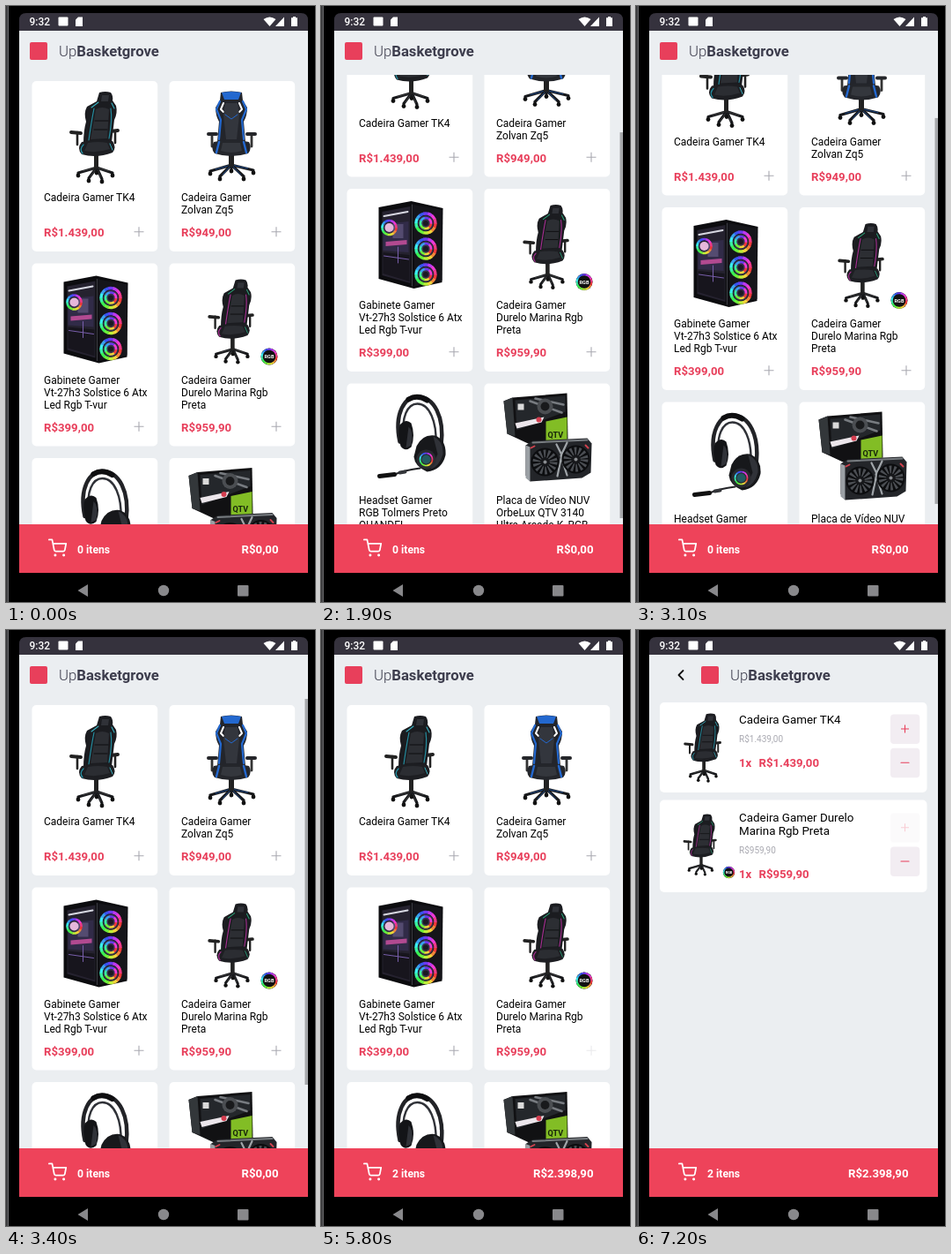
An HTML page for the animation above (8 s loop, 351x675 px).

```html
<!DOCTYPE html>
<html lang="pt-BR">
<head>
<meta charset="utf-8">
<title>Loja</title>
<style>
  html, body { margin: 0; width: 100%; height: 100%; overflow: hidden; background: #000; }
  svg { display: block; width: 351px; height: 675px; }
  text { font-family: Roboto, "Noto Sans", sans-serif; }
</style>
</head>
<body>
<svg id="stage" viewBox="0 0 351 675"></svg>
<script>
const RED = '#e83f5b', BG = '#ebeef1', DARK = '#17181b';

// ---- markup helpers ----
const text = (x, y, size, str, { fill = '#000', weight = 400, extra = '' } = {}) =>
  `<text x="${x}" y="${y}" font-size="${size}" font-weight="${weight}" fill="${fill}" ${extra}>${str}</text>`;
const rect = (x, y, w, h, fill, r = 0) =>
  `<rect x="${x}" y="${y}" width="${w}" height="${h}" rx="${r}" fill="${fill}"/>`;
const shape = (d, fill) => `<path d="${d}" fill="${fill}"/>`;
const line = (d, stroke, w = 1) =>
  `<path d="${d}" fill="none" stroke="${stroke}" stroke-width="${w}" stroke-linecap="round" stroke-linejoin="round"/>`;
const disc = (x, y, r, fill) => `<circle cx="${x}" cy="${y}" r="${r}" fill="${fill}"/>`;
const group = (x, y, body, scale = 1, extra = '') =>
  `<g transform="translate(${x} ${y}) scale(${scale})" ${extra}>${body}</g>`;
const cross = (x, y, r, color, id = '') =>
  `<path ${id && `id="${id}"`} d="M${x - r} ${y}h${2 * r}M${x} ${y - r}v${2 * r}" stroke="${color}" stroke-width="1.1"/>`;

function ring(x, y, r, w, n = 14) {
  let out = '';
  for (let i = 0; i < n; i++) {
    const a = i / n * 2 * Math.PI, b = (i + 1.1) / n * 2 * Math.PI;
    const p = k => `${(x + r * Math.cos(k)).toFixed(2)} ${(y + r * Math.sin(k)).toFixed(2)}`;
    out += `<path d="M${p(a)}A${r} ${r} 0 0 1 ${p(b)}" fill="none" stroke="hsl(${i / n * 360} 85% 58%)" stroke-width="${w}"/>`;
  }
  return out;
}

// ---- product art ----
function wheels(points, hub, trim) {
  return points.map(([x, y]) =>
    line(`M${hub[0]} ${hub[1]}L${x} ${y - 3}`, DARK, 3.2) +
    line(`M${hub[0]} ${hub[1]}L${x * .75 + hub[0] * .25} ${y - 5}`, trim, .6) +
    disc(x, y, 2.4, '#111')).join('');
}

function chair(a, b) {
  return wheels([[-19, 95], [-7, 101], [8, 102], [20, 95], [2, 92]], [2, 86], '#555') +
    rect(-1, 70, 5, 17, '#222') +
    line('M-20 46v14M23 45v13', '#222', 2.6) +
    line('M-27 46L-16 47M17 45L26 44', '#222', 4) +
    shape('M5 1Q12-1 18 1Q21 5 20 10L24 16Q26 24 22 32L19 57L-13 59Q-13 44-10 34Q-13 24-9 17L2 11Z', '#1b1c20') +
    shape('M1 20Q8 16 16 20L14 53L-5 54Z', '#2c2e33') +
    shape('M8 4h8l-1 7h-8z', '#303238') +
    line('M-1 19Q-4 34-7 55M18 19Q20 32 16 53', a, 1.2) +
    line('M4 12L-4 18M19 13l3 6', b, 1.1) +
    line('M0 33h15M-1 43h15', '#0d0d0f', 1) +
    shape('M-15 57Q2 53 20 56Q25 63 20 69Q2 76-15 71Q-21 64-15 57Z', '#1d1e22') +
    shape('M-8 58Q4 56 14 58L17 65Q2 70-12 67Z', '#2b2d32') +
    line('M-13 60Q-18 65-14 70', a, 1.3) + line('M17 59L20 66', b, 1);
}

function blueChair() {
  const blue = '#2368cf';
  return wheels([[-24, 93], [-13, 99], [14, 99], [25, 92], [0, 90]], [0, 83], blue) +
    rect(-3, 70, 6, 15, '#222') +
    line('M-22 48v14M23 48v14', '#333', 2.8) +
    line('M-26 48h9M18 48h9', '#25262a', 4) +
    shape('M-12 1Q0-2 12 1L13 10L18 18Q18 27 14 34L16 57L-16 57L-14 34Q-18 27-18 18L-13 10Z', '#23252b') +
    shape('M-11 1Q0-1 11 1L8 9H-8Z', blue) +
    line('M-13 11L-17 20L-12 32L-14 54M13 11L17 20L12 32L14 54', blue, 2.2) +
    line('M-9 13l-3 7 3 3M9 13l3 7-3 3', '#fff', 2) +
    shape('M-7 13H7L9 27L6 54H-6L-9 27Z', '#33363d') +
    line('M-7 26L0 31L7 26', blue, 1) +
    shape('M-20 57Q0 52 20 57Q24 64 19 70Q0 76-19 70Q-24 64-20 57Z', '#24262b') +
    line('M-14 57L-17 69M14 57L17 69', blue, 2.4) +
    shape('M-10 58H10L12 67Q0 71-12 67Z', '#34373d');
}

function tower() {
  let out = shape('M36 21L73 14L109 22L108 106L76 113L36 102Z', '#0c0c0f') +
    shape('M40 26L72 20V107L40 98Z', '#25222f') +
    shape('M41 40L70 37V72L41 70Z', '#312b48') +
    shape('M41 72L71 75V105L41 96Z', '#17151d') +
    shape('M44 60L68 58V63L44 65Z', '#b24a91') +
    shape('M52 40h12v16h-12z', '#544b70') +
    line('M42 76L70 80M58 66v18', '#785eab', 1) +
    ring(48, 44, 8, 2.6) + disc(48, 44, 5, '#e5b7da') +
    line('M42 31L69 26', '#d7d8e1', 2) +
    shape('M75 18L108 24V104L77 110Z', '#15151a') +
    line('M74 18V110', '#3b3b42', 1.2);
  for (const y of [39, 68, 97]) {
    out += ring(89.5, y, 11, 3.4) + disc(89.5, y, 8.7, '#36334c') + ring(89.5, y, 6, 2.6, 7) + disc(89.5, y, 3, '#1b1a22');
  }
  return out;
}

const badge = () => disc(0, 0, 9.5, '#111') + ring(0, 0, 8.3, 2) +
  text(0, 2.2, 5.6, 'RGB', { fill: '#fff', weight: 700, extra: 'text-anchor="middle"' });

function headset() {
  return line('M60 66C53 33 66 15 80 15C99 15 111 38 107 70', '#222327', 4.5) +
    line('M65 62C61 38 69 23 80 23C94 23 102 44 101 68', '#303238', 2.4) +
    line('M70 18Q80 12 91 19', '#0e0e10', 6) +
    shape('M60 47Q67 39 73 45Q78 59 73 72Q66 78 61 71Q57 58 60 47Z', '#131417') +
    shape('M70 49Q76 54 73 70L67 73Z', '#303238') +
    shape('M79 71Q86 57 100 59Q113 64 112 81Q108 98 91 100Q77 94 76 83Z', '#17181b') +
    shape('M98 60Q110 65 109 80Q105 94 95 97L103 80Z', '#303238') +
    disc(90, 86, 11, '#292b30') + ring(90, 86, 7, 1.7) + disc(90, 86, 5, '#225b62') +
    line('M83 96Q66 98 54 103', '#222327', 2) +
    line('M54 103L37 105', '#111', 5) + line('M60 101L66 100', '#34363a', 4);
}

function graphicsCard() {
  return shape('M22 20L32 16L94 11L95 63L54 70L26 57Z', '#111113') +
    shape('M22 20L32 16L35 60L26 57Z', '#33373a') +
    shape('M35 19L92 14V32L37 53Z', '#24272b') +
    line('M52 20L88 33M58 17L90 24', '#777b80', 2.5) +
    disc(69, 26, 9, '#4b4e52') + disc(69, 26, 5, '#191a1c') +
    rect(38, 23, 7, 7, '#dadada') +
    shape('M35 45L68 38L65 44L37 51Z', '#ece6eb') +
    disc(62, 41, 3, '#d43e50') +
    shape('M70 43L94 38V66L70 69Z', '#82bd25') +
    text(72, 61, 9, 'QTV', { fill: '#17250a', weight: 700 }) +
    shape('M47 70L55 65L117 62L122 68L121 101L111 107L52 111L47 104Z', '#232529') +
    shape('M47 70L52 72V111L47 107Z', '#9ba0a5') +
    line('M55 67L117 64', '#777c80', 2) +
    line('M82 69L88 81L83 105M94 67L87 82L94 104', '#a0a5a9', 2.2) +
    [[69, 89], [104, 86]].map(([x, y]) =>
      disc(x, y, 16, '#0c0d0f') +
      `<circle cx="${x}" cy="${y}" r="9.5" fill="none" stroke="#4b4e53" stroke-width="9" stroke-dasharray="2.2 2.1"/>` +
      disc(x, y, 5, '#17181b') + disc(x, y, 2, '#8a8d91')).join('') +
    line('M53 73L57 71M118 73L115 70', '#d4424e', 1.8);
}

const tealChair = chair('#258ea0', '#38b1c0');
const neonChair = chair('#a72f92', '#2a9f77');

// ---- screens ----
const rows = [[85, 193], [291.5, 207], [512, 221]];
const products = [
  [['Cadeira Gamer TK4'], 'R$1.439,00', group(71.5, 12, tealChair)],
  [['Cadeira Gamer', 'Zolvan Zq5'], 'R$949,00', group(70.5, 12, blueChair())],
  [['Gabinete Gamer', 'Vt-27h3 Solstice 6 Atx', 'Led Rgb T-vur'], 'R$399,00', group(0, 0, tower())],
  [['Cadeira Gamer', 'Durelo Marina Rgb', 'Preta'], 'R$959,90',
    group(70.5, 18, neonChair, .92) + group(113.5, 105.5, badge())],
  [['Headset Gamer', 'RGB Tolmers Preto', 'QUANDEL'], 'R$157,00', headset()],
  [['Placa de Vídeo NUV', 'OrbeLux QTV 3140', 'Ultra Arcade K, RGB,', '8GB GDDR6'], 'R$3.559,00', graphicsCard()]
];

const productCard = ([lines, price, art], i) => {
  const [y, h] = rows[i >> 1];
  return group(i % 2 ? 185.5 : 29.5, y,
    rect(0, 0, 142.7, h, '#fff', 5) + art +
    lines.map((s, k) => text(13.5, 136 + 14 * k, 12, s)).join('') +
    text(13.5, h - 17, 13.2, price, { fill: RED, weight: 700 }) +
    cross(121.5, h - 22.3, 5.5, '#a9a9b1', 'add' + i));
};

const header = x => rect(x, 41, 20, 20, RED, 2) +
  text(x + 33, 57, 16.7, 'Up<tspan font-weight="700">Basketgrove</tspan>', { fill: '#3d3d4d', weight: 300 });

const cartIcon = group(48, 603.5, line('M1 1h4l2.7 13.4a2 2 0 0 0 2 1.6h9.7a2 2 0 0 0 2-1.6L23 6H6', '#fff', 2) +
  disc(9, 21, 1.7, '#fff') + disc(20, 21, 1.7, '#fff'), .88);

const footer = name => rect(15, 587, 328, 55, '#ee435a') +
  `<g id="${name}Open">` + cartIcon +
  text(81, 619.5, 12.2, '', { fill: '#fff', weight: 700, extra: `id="${name}Count"` }) + '</g>' +
  text(309.5, 619.5, 13.2, '', { fill: '#fff', weight: 700, extra: `id="${name}Total" text-anchor="end"` });

const button = (y, minus, id) => `<g ${id ? `id="${id}"` : ''}>` + rect(289, y, 33.3, 33.5, '#f2edf2', 4) +
  (minus ? line(`M301 ${y + 16.5}h9`, RED, 1.1) : cross(305.5, y + 16.5, 4.5, RED)) + '</g>';

const cartRow = (y, h, lines, price, art, id) => {
  const base = y + 24 + 15.3 * (lines.length - 1);
  return rect(27, y, 303.5, h, '#fff', 5) + art +
    lines.map((s, k) => text(117, y + 24 + 15.3 * k, 13.4, s)).join('') +
    text(117, base + 21, 10, price, { fill: '#a9a9b1' }) +
    text(117, base + 49, 13.2, '1x', { fill: RED, weight: 700 }) +
    text(139.5, base + 49, 13.2, price, { fill: RED, weight: 700 }) +
    button(y + h / 2 - 37.5, false, id) + button(y + h / 2 + .8, true);
};

const shop = rect(15, 28, 328, 614, BG) + header(27) +
  '<g clip-path="url(#list)"><g id="cards">' + products.map(productCard).join('') + '</g>' +
  '<rect id="bar" x="339.5" width="3.5" height="437" fill="#000" fill-opacity=".3"/></g>' + footer('shop');

const cart = rect(15, 28, 328, 614, BG) + line('M53.5 46L48.5 51L53.5 56', '#111', 1.8) + header(74) +
  cartRow(82, 102, ['Cadeira Gamer TK4'], 'R$1.439,00', group(76, 94.5, tealChair, .75)) +
  cartRow(192.5, 104.5, ['Cadeira Gamer Durelo', 'Marina Rgb Preta'], 'R$959,90',
    group(73, 208.5, neonChair, .67) + group(105.5, 274.5, badge(), .7), 'more') +
  footer('cart');

const statusBar = shape('M15 28V16Q15 8 23 8H335Q343 8 343 16V28Z', '#35323d') +
  text(26.5, 22, 12, '9:32', { fill: '#fff', weight: 500 }) +
  rect(59.5, 12.5, 11, 10, '#fff', 1) +
  shape('M82 12.5h5v10.5h-8v-7.5z', '#fff') +
  shape('M292.5 15Q299.5 10 306.5 15L299.5 23Z', '#fff') + shape('M316 12.5V23H306Z', '#fff') +
  shape('M326 12h3v1.3h2V23h-7V13.3h2z', '#fff');

const navBar = rect(15, 642, 328, 33, '#000') + shape('M81.5 662L93 655V669Z', '#88888b') +
  disc(179, 662, 6.2, '#88888b') + rect(263, 656, 12.5, 12.5, '#88888b', 1);

const $ = id => document.getElementById(id);
$('stage').innerHTML =
  '<defs><clipPath id="list"><rect x="15" y="78" width="328" height="509"/></clipPath>' +
  '<clipPath id="page"><rect x="15" y="28" width="328" height="614"/></clipPath></defs>' +
  rect(0, 0, 351, 675, '#000') + rect(0, 0, 2, 675, '#3d3d3f') + rect(2, 0, 1, 675, '#707073') +
  `<g clip-path="url(#page)">${shop}<g id="cart">${cart}</g></g>` + statusBar + navBar;

// ---- timeline: [ms, value], each value holds until the next ----
const LOOP = 8000;
const track = {
  scroll: [[0, 0], [100, 20], [1900, 84.5], [2000, 113], [2100, 133], [2200, 146],
    [2900, 130], [3000, 97], [3100, 63.5], [3200, 34], [3300, 10], [3400, 0]],
  bar: [[0, 0], [100, 1], [3600, .75], [3700, .5], [3800, .25], [3900, 0]],
  add0: [[0, 1], [4000, .25], [4400, 1]],
  add3: [[0, 1], [4600, .25], [6100, 1]],
  basket: [[0, [0, 'R$0,00']], [4200, [1, 'R$1.439,00']], [5800, [2, 'R$2.398,90']]],
  open: [[0, 1], [6300, .3]],
  page: [[0, 0], [6500, .15], [6800, .5], [6900, .78], [7000, .93], [7100, 1]],
  more: [[0, 1], [7200, .25]]
};
const at = (name, t) => track[name].filter(([ms]) => ms <= t).pop()[1];

function render(t) {
  const y = at('scroll', t), p = at('page', t), [count, total] = at('basket', t);
  const s = .85 + .15 * p;
  $('cards').setAttribute('transform', `translate(0 ${-y})`);
  $('bar').setAttribute('y', 78 + y * .77);
  $('bar').setAttribute('opacity', at('bar', t));
  for (const id of ['add0', 'add3', 'more']) $(id).setAttribute('opacity', at(id, t));
  $('shopOpen').setAttribute('opacity', at('open', t));
  for (const name of ['shop', 'cart']) {
    $(name + 'Count').textContent = count + ' itens';
    $(name + 'Total').textContent = total;
  }
  $('cart').setAttribute('opacity', p);
  $('cart').setAttribute('transform', `translate(179 335) scale(${s}) translate(-179 -335)`);
}

const start = performance.now();
function tick() {
  render((performance.now() - start) % LOOP);
  requestAnimationFrame(tick);
}
tick();
</script>
</body>
</html>
```
